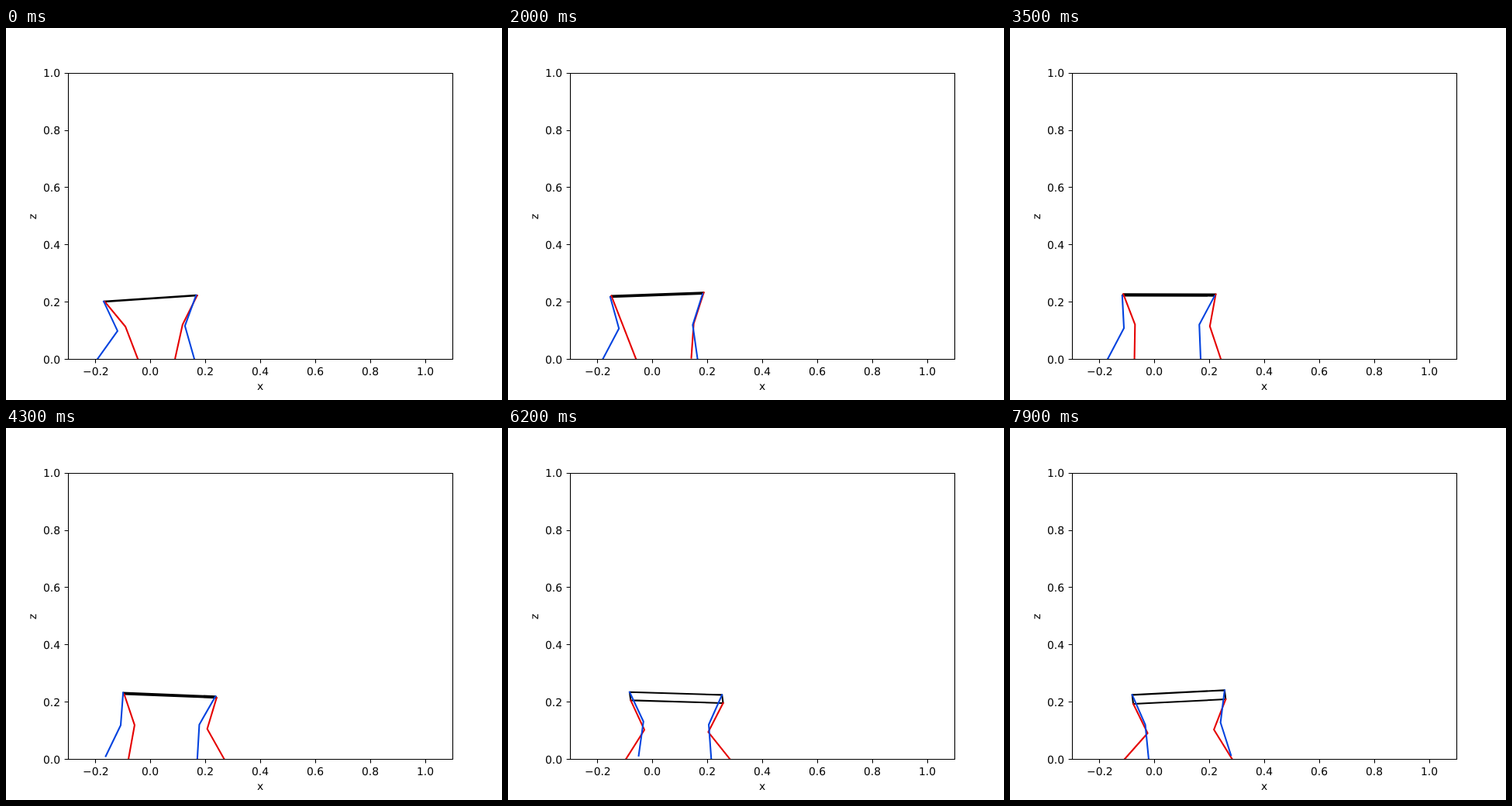
These frames come from a looping animation (640x480 px, 8000 ms). An HTML page:

```html
<!DOCTYPE html>
<html lang="en">
<head>
<meta charset="utf-8">
<title>Walking gait</title>
<style>
  html, body { margin: 0; width: 100%; height: 100%; overflow: hidden; background: #fff; }
  svg { display: block; width: 640px; height: 480px; }
  text { font: 13.889px "DejaVu Sans", sans-serif; text-rendering: geometricPrecision; }
  .axes { fill: none; stroke: #000; stroke-width: 1.11; }
  .robot * { fill: none; stroke-width: 2.083; stroke-linecap: square; stroke-linejoin: round; }
</style>
</head>
<body>
<svg viewBox="0 0 640 480">
  <clipPath id="area"><rect x="80" y="57.6" width="496" height="369.6"/></clipPath>
  <g class="robot" clip-path="url(#area)">
    <polygon id="body" stroke="#000"/>
    <polyline id="rearRed" stroke="#e50000"/>
    <polyline id="frontRed" stroke="#e50000"/>
    <polyline id="rearBlue" stroke="#0343df"/>
    <polyline id="frontBlue" stroke="#0343df"/>
  </g>
  <path class="axes" id="axes"/>
  <g id="labels"></g>
</svg>
<script>
const LOOP = 8000, STEP = 100;
const GROUND = 427, BODY = 119.2, THIGH = 42, SHANK = 44.4;

// Key points of the trunk: height of its middle, front-rear pitch, red-blue roll
const trunk = [
  { t: 0, height: 349, pitch: -8, roll: 0.3 },
  { t: 950, height: 344.3, pitch: -8.4, roll: -6.4 },
  { t: 2000, height: 344.3, pitch: -4.2, roll: -1.7 },
  { t: 3500, height: 344.5, pitch: 0.2, roll: -2 },
  { t: 5500, height: 346, pitch: 9.7, roll: 9.8 },
  { t: 6800, height: 349, pitch: -2.7, roll: 11 },
  { t: 7900, height: 347.2, pitch: -6, roll: 11.7 }
];

const $ = id => document.getElementById(id);

// Smooth move by size around time mid
const move = (t, size, mid, width) => size / (1 + Math.exp((mid - t) / width));
const bump = (t, size, mid, width) => size * Math.exp(-(((t - mid) / width) ** 2));

// end: -1 rear, 1 front; side: -1 blue, 1 red
const legs = {
  rearRed: {
    end: -1, side: 1,
    foot: t => 178 + move(t, -38, 4000, 3000),
    lift: () => 0
  },
  frontRed: {
    end: 1, side: 1,
    foot: t => 217 + move(t, 69.5, 2620, 660),
    lift: t => bump(t, 8, 1050, 720)
  },
  frontBlue: {
    end: 1, side: -1,
    foot: t => 240.5 + move(t, 12, 4000, 3000) + move(t, 35.5, 6350, 320),
    lift: t => bump(t, 5.5, 8100, 500)
  },
  rearBlue: {
    end: -1, side: -1,
    foot: t => 113 + move(t, 24, 3000, 2300) + move(t, 44.5, 5750, 300),
    lift: t => bump(t, 9.5, 5300, 1000)
  }
};

function slope(i, key) {
  const a = trunk[i], b = trunk[i + 1];
  return (b[key] - a[key]) / (b.t - a.t);
}

// Tangent that never overshoots the neighbouring key points
function tangent(i, key) {
  if (i === 0) return slope(0, key);
  if (i === trunk.length - 1) return slope(i - 1, key);
  const a = slope(i - 1, key), b = slope(i, key);
  return a * b <= 0 ? 0 : 2 * a * b / (a + b);
}

function sample(key, t) {
  let i = 0;
  while (i < trunk.length - 2 && t >= trunk[i + 1].t) i++;
  const a = trunk[i], b = trunk[i + 1];
  const h = b.t - a.t, u = (t - a.t) / h, v = 1 - u;
  return v * v * (1 + 2 * u) * a[key] + u * u * (3 - 2 * u) * b[key]
    + h * u * v * (v * tangent(i, key) - u * tangent(i + 1, key));
}

// Rear knees bend forwards, front knees backwards
function kneeOf([hx, hy], [fx, fy], end) {
  const reach = Math.hypot(fx - hx, fy - hy);
  const cos = (THIGH ** 2 + reach ** 2 - SHANK ** 2) / (2 * THIGH * reach);
  const angle = Math.atan2(fx - hx, fy - hy) - end * Math.acos(Math.min(1, cos));
  const straight = reach > THIGH + SHANK;
  const a = straight ? Math.atan2(fx - hx, fy - hy) : angle;
  return [hx + THIGH * Math.sin(a), hy + THIGH * Math.cos(a)];
}

function setPoints(id, points) {
  $(id).setAttribute("points", points.map(p => p.map(n => n.toFixed(2)).join()).join(" "));
}

function draw(t) {
  const rearX = 126 + move(t, 32.5, 3150, 850);
  const height = sample("height", t), pitch = sample("pitch", t), roll = sample("roll", t);
  const hips = [];
  for (const [id, { end, side, foot, lift }] of Object.entries(legs)) {
    const hip = [
      rearX + (end + 1) / 2 * BODY + side * 0.7,
      height + (end * pitch + side * roll) / 2
    ];
    const toe = [foot(t), GROUND - lift(t)];
    setPoints(id, [hip, kneeOf(hip, toe, end), toe]);
    hips.push(hip);
  }
  setPoints("body", hips);
}

// align: share of the text width left of x
function addText(str, x, y, align) {
  const el = document.createElementNS("http://www.w3.org/2000/svg", "text");
  el.textContent = str;
  $("labels").append(el);
  el.setAttribute("x", Math.round(x - align * el.getComputedTextLength()));
  el.setAttribute("y", Math.round(y));
  return el;
}

function drawAxes() {
  const snap = n => Math.floor(n + 0.5) + 0.5;
  let path = "M80.5 58.5H576.5V427.5H80.5Z";
  for (let i = -1; i <= 5; i++) {
    const x = 80 + (i * 0.2 + 0.3) * 496 / 1.4;
    path += `M${snap(x)} 427.5v4.9`;
    addText((i * 0.2).toFixed(1).replace("-", "\u2212"), x, 448, 0.5);
  }
  for (let i = 0; i <= 5; i++) {
    const y = 427.2 - i * 0.2 * 369.6;
    path += `M80.5 ${snap(y)}h-4.9`;
    addText((i * 0.2).toFixed(1), 70.3, y + 5.3, 1);
  }
  $("axes").setAttribute("d", path);
  addText("x", 328, 467, 0.5);
  addText("z", 0, 0, 0).setAttribute("transform", "translate(39 247) rotate(-90)");
}

drawAxes();
const start = performance.now();

function tick() {
  const t = (performance.now() - start) % LOOP;
  draw(Math.floor(t / STEP) * STEP);
  requestAnimationFrame(tick);
}
tick();
</script>
</body>
</html>
```
